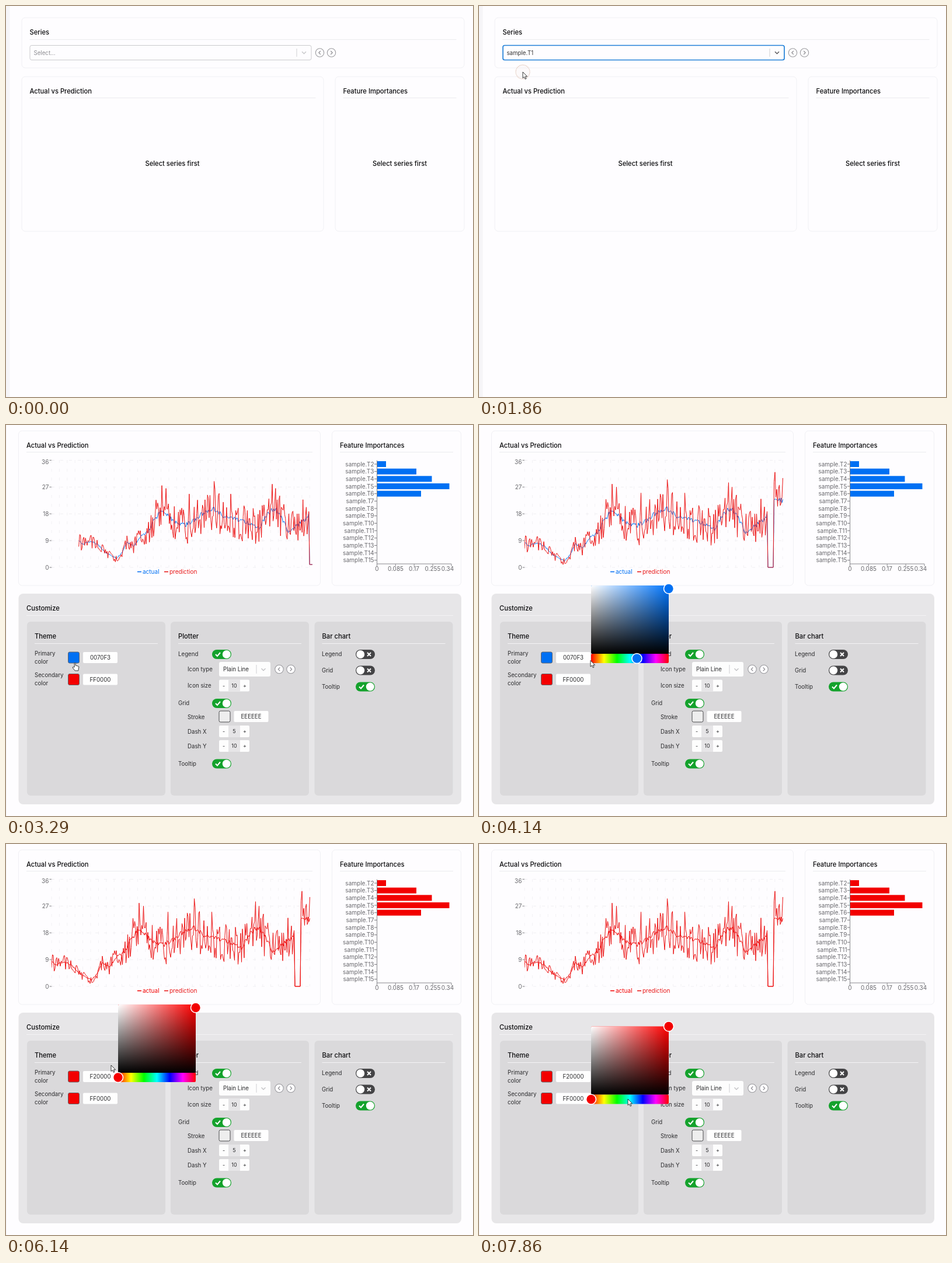
An HTML page for the animation above (8000 ms loop, 800x670 px).

```html
<!DOCTYPE html>
<html lang="en">
<head>
<meta charset="utf-8">
<title>Forecast dashboard</title>
<style>
  html, body { margin: 0; width: 100%; height: 100%; overflow: hidden; background: #fefdff; }
  svg { display: block; width: 800px; height: 670px; font: 9.7px Inter, "Open Sans", sans-serif; }
</style>
</head>
<body>
<svg id="stage" viewBox="0 0 800 670"></svg>
<script>
const LOOP = 8000, FPS = 7, PAGE_SCROLL = 111;
const stage = document.getElementById('stage');

// ---------- drawing helpers ----------
function set(node, attrs) {
  for (const k in attrs) node.setAttribute(k, attrs[k]);
  return node;
}
function el(parent, tag, attrs) {
  return parent.appendChild(set(document.createElementNS('http://www.w3.org/2000/svg', tag), attrs));
}
const group = (parent, attrs) => el(parent, 'g', attrs);
const rect = (p, x, y, width, height, fill, more) => el(p, 'rect', { x, y, width, height, fill, ...more });
const path = (p, d, stroke, more) => el(p, 'path', { d, stroke, fill: 'none', ...more });
function text(p, x, y, str, more) {
  const node = el(p, 'text', { x, y, fill: '#2b2b2d', ...more });
  node.textContent = str;
  return node;
}
const title = (p, x, y, str, more) => text(p, x, y, str, { 'font-size': 11.2, 'font-weight': 500, fill: '#0c0c0e', ...more });
const show = (node, on) => node.setAttribute('display', on ? 'inline' : 'none');
const rule = (p, x1, x2, y, color = '#ebebee') => path(p, `M${x1} ${y}H${x2}`, color);
const card = (p, x, y, w, h) => rect(p, x, y, w, h, '#fefdff', { rx: 6, stroke: '#f0f0f4' });
const chevron = (p, x, y, color) => path(p, `M${x - 3.5} ${y - 1.8}l3.5 3.5l3.5 -3.5`, color, { 'stroke-width': 1.5 });

function arrows(p, x, y) {
  for (const [cx, dir] of [[x, -1], [x + 20, 1]]) {
    el(p, 'circle', { cx, cy: y, r: 7.2, fill: '#fefdff', stroke: '#9b9b9f', 'stroke-width': 1.1 });
    path(p, `M${cx - dir * 1.3} ${y - 3}l${dir * 3} 3l${-dir * 3} 3`, '#8a8a8e', { 'stroke-width': 1.1 });
  }
}
function toggle(p, x, y, on) {
  rect(p, x, y - 8, 33, 16, on ? '#14a22c' : '#444446', { rx: 8 });
  el(p, 'circle', { cx: x + (on ? 24.8 : 8.2), cy: y, r: 7, fill: '#fff' });
  const mark = on ? `M${x + 6} ${y}l3 3l5 -6` : `M${x + 20} ${y - 3}l6 6m0 -6l-6 6`;
  path(p, mark, '#fff', { 'stroke-width': 2 });
}
function stepper(p, y, value) {
  rect(p, 365, y - 10, 52, 20, '#fdfdfd', { rx: 2 });
  rect(p, 381, y - 10, 20, 20, '#e6e5e7');
  [['-', 373], [value, 391], ['+', 409]].forEach(([s, x]) =>
    text(p, x, y + 3.2, s, { 'text-anchor': 'middle', 'font-size': 9 }));
}
function colorField(p, x, y, fill, code, stroke = '#66666a') {
  const box = rect(p, x + .5, y - 9.5, 19, 19, fill, { rx: 2.5, stroke });
  rect(p, x + 26, y - 9.5, 59, 19, '#fefefe', { rx: 2 });
  return { box, label: text(p, x + 55.5, y + 3.5, code, { 'text-anchor': 'middle' }) };
}

// ---------- time helpers ----------
function track(table, at) {
  if (at <= table[0][0]) return table[0].slice(1);
  for (let i = 1; i < table.length; i++) {
    const [a, b] = [table[i - 1], table[i]];
    if (at <= b[0]) {
      const k = (at - a[0]) / (b[0] - a[0]);
      return b.slice(1).map((v, j) => a[j + 1] + (v - a[j + 1]) * k);
    }
  }
  return table.at(-1).slice(1);
}
const clamp = v => Math.max(0, Math.min(1, v));
const bezier = (a, b, s) => 3 * a * s * (1 - s) ** 2 + 3 * b * s * s * (1 - s) + s ** 3;
function ease(x) {
  x = clamp(x);
  let lo = 0, hi = 1;
  for (let i = 0; i < 20; i++) {
    const mid = (lo + hi) / 2;
    if (bezier(.25, .25, mid) < x) lo = mid; else hi = mid;
  }
  return x === 1 ? 1 : bezier(.1, 1, lo);
}
function hsvHex(h, v) {
  const channel = n => {
    const k = (n + h / 60) % 6;
    return Math.round(v * (1 - clamp(Math.min(k, 4 - k)))).toString(16).padStart(2, '0');
  };
  return (channel(5) + channel(3) + channel(1)).toUpperCase();
}

// ---------- gradients and clip ----------
const defs = el(stage, 'defs', {});
function gradient(id, stops, vertical) {
  const g = el(defs, 'linearGradient', { id, x2: vertical ? 0 : 1, y2: vertical ? 1 : 0 });
  stops.forEach(([color, opacity = 1], i) =>
    el(g, 'stop', { offset: i / (stops.length - 1), 'stop-color': color, 'stop-opacity': opacity }));
}
gradient('whiten', [['#fff'], ['#fff', 0]]);
gradient('darken', [['#000', 0], ['#000']], true);
gradient('hues', [0, 60, 120, 180, 240, 300, 360].map(h => [`hsl(${h} 100% 50%)`]));
rect(el(defs, 'clipPath', { id: 'plotArea' }), 78, 160, 447, 200, '#000');

// ---------- page ----------
const strip = rect(stage, 0, 0, 6, 670, '#f6f5f8');
const page = group(stage, {});

card(page, 21.5, 20, 758, 86);
title(page, 35, 48.5, 'Series');
rule(page, 35, 766, 57.5);
const selectBox = rect(page, 35.5, 67.5, 482, 25, '#fefdff', { rx: 3 });
const selectText = text(page, 42, 83.5, '');
const caret = path(page, 'M43 73.5V87', '#333');
path(page, 'M492.5 73V87', '#cfcfd2');
const selectChevron = chevron(page, 505, 80, '#ccc');
arrows(page, 532, 80);

card(page, 21.5, 121, 517, 265);
title(page, 35, 149.5, 'Actual vs Prediction');
rule(page, 35, 525, 157.5);
card(page, 558.5, 121, 221, 265);
title(page, 572, 149.5, 'Feature Importances');
rule(page, 572, 766, 157.5);

const empty = group(page, { 'text-anchor': 'middle' });
for (const x of [279.5, 669]) title(empty, x, 274, 'Select series first');

const results = group(page, {});

// ---------- line chart ----------
const axisText = { fill: '#68686c', 'text-anchor': 'end', 'font-size': 10 };
const yOf = v => 355 - v * 5.1;
const dash = { 'stroke-dasharray': '5 10' };
for (let v = 0; v <= 36; v += 9) {
  path(results, `M78 ${yOf(v)}H525`, '#f0eff2', dash);
  path(results, `M74.5 ${yOf(v)}H78.5`, '#77777b');
  text(results, 73.5, yOf(v) + (v === 36 ? 6.5 : 3.7), v, axisText);
}
for (let x = 78; x < 525; x += 13.4) path(results, `M${x} 171V355`, '#f2f1f4', dash);

const TREND = [[78, 8], [86, 7.4], [101, 8.2], [113, 7], [125, 4.5], [146, 2.2], [156, 4.2], [165, 8], [176, 6.4],
  [190, 10], [205, 12], [216, 16.5], [228, 19], [240, 17], [252, 15], [270, 14], [285, 15.5], [302, 18], [322, 20],
  [340, 17], [372, 15.5], [404, 13], [418, 18], [434, 20], [446, 16], [456, 12], [470, 13.5], [490, 16.5], [505, 23], [522, 22.5]];
const SPREAD = [[78, 3.8], [113, 2.2], [146, 1.6], [180, 3.4], [205, 4.5], [222, 8.5], [250, 7], [322, 8.5], [400, 7], [430, 8.5], [490, 6.5], [522, 8]];
const PEAKS = [[228, 28], [235, 27], [278, 25], [322, 29.5], [352, 25], [428, 28.5], [434, 27], [483, 23], [507, 32], [521, 30]];

let seed = 41;
const random = () => (seed = (seed * 16807) % 2147483647) / 2147483647;
const smooth = [], noisy = [];
for (let x = 78; x <= 521; x += 1.5) {
  const outage = x > 494.5 && x < 504.5;
  const mid = track(TREND, x)[0], swing = track(SPREAD, x)[0];
  const peak = PEAKS.find(p => Math.abs(p[0] - x) <= .75);
  const side = random() < .5 ? -1 : 1;
  const jitter = side * (.1 + .9 * random()) * swing * (side < 0 ? .95 : .85);
  smooth.push([x, outage ? 0 : mid + (random() - .5) * swing * .22]);
  noisy.push([x, outage ? 0 : peak ? peak[1] : Math.max(.5, mid + jitter)]);
}
const lines = group(results, { 'clip-path': 'url(#plotArea)', 'stroke-linejoin': 'round' });
const actual = path(lines, '', '');
const prediction = path(lines, '', '#ec1212');
// Points fly in from the far right at mid height.
const plot = (points, p) => 'M' + points.map(([x, v]) =>
  `${(978 + (x - 978) * p).toFixed(1)} ${(261 + (yOf(v) - 261) * p).toFixed(1)}`).join('L');

const legend = { 'font-size': 10 };
const actualMark = path(results, 'M225 362.5H232', '', { 'stroke-width': 1.6 });
const actualName = text(results, 234, 365.5, 'actual', legend);
path(results, 'M271 362.5H278', '#e81818', { 'stroke-width': 1.6 });
text(results, 280, 365.5, 'prediction', { ...legend, fill: '#e81818' });

// ---------- bar chart ----------
const BARS = [15, 67, 93.5, 123.5, 75];
const bars = [];
for (let i = 0; i < 14; i++) {
  const y = 178 + i * 12.67;
  text(results, 630.5, y + 3.5, 'sample.T' + (i + 2), axisText);
  path(results, `M631 ${y}H635`, '#77777b');
  if (i < BARS.length) bars.push(rect(results, 636, y - 5, 0, 10, ''));
}
path(results, 'M635.5 171.5V349H763v4m-31.9 -4v4m-31.9 -4v4m-31.9 -4v4m-31.8 -4v4', '#88888c');
[[635.5, 0], [667.5, .085], [699, .17], [731, .255], [756.5, .34]].forEach(([x, v]) =>
  text(results, x, 361, v, { ...axisText, 'text-anchor': 'middle' }));

// ---------- customize ----------
rect(results, 21.5, 400, 758.5, 361, '#e7e6e8', { rx: 8 });
title(results, 35, 429, 'Customize');
rule(results, 35, 766, 437.5, '#f3f2f4');
[['Theme', 36], ['Plotter', 282], ['Bar chart', 528.5]].forEach(([name, x]) => {
  rect(results, x, 448, 237, 298, '#dad9db', { rx: 6 });
  title(results, x + 13, 477, name);
  rule(results, x + 13, x + 224, 485.5, '#f3f2f4');
});
[['Primary', 506], ['color', 520], ['Secondary', 543], ['color', 557]].forEach(([s, y]) => text(results, 49, y, s));
const primary = colorField(results, 106, 509.5, '#0070f3', '0070F3');
colorField(results, 106, 547, '#f40000', 'FF0000');

[['Legend', 504, 1], ['Grid', 588, 1], ['Tooltip', 691.5, 1]].forEach(([s, y]) => {
  text(results, 295, y + 3.3, s);
  toggle(results, 353, y, true);
});
[['Icon type', 533], ['Icon size', 561], ['Stroke', 614.5], ['Dash X', 639.5], ['Dash Y', 665]].forEach(([s, y]) => text(results, 311, y, s));
rect(results, 365, 517, 88, 25, '#fdfdfd', { rx: 3 });
text(results, 372, 533.3, 'Plain Line');
path(results, 'M429 522V537', '#cfcfd2');
chevron(results, 441, 530, '#c4c4c7');
arrows(results, 468, 529.5);
[[557.5, 10], [636, 5], [661, 10]].forEach(([y, v]) => stepper(results, y, v));
colorField(results, 364.5, 610.5, '#eeeeee', 'EEEEEE', '#4a4a4d');

[['Legend', 504, false], ['Grid', 531.5, false], ['Tooltip', 559.5, true]].forEach(([s, y, on]) => {
  text(results, 541, y + 3.3, s);
  toggle(results, 599, y, on);
});

// ---------- color picker ----------
const picker = group(page, {});
const pickerBase = rect(picker, 192, 386, 133, 117, '#f00', { rx: 2 });
rect(picker, 192, 386, 133, 117, 'url(#whiten)', { rx: 2 });
rect(picker, 192, 386, 133, 117, 'url(#darken)', { rx: 2 });
rect(picker, 192, 503, 133, 16, 'url(#hues)', { rx: 2 });
const knob = { r: 8.5, stroke: '#fff', 'stroke-width': 1.6 };
const toneKnob = el(picker, 'circle', { cx: 325, ...knob });
const hueKnob = el(picker, 'circle', { cy: 511, ...knob });

// ---------- dropdown ----------
const menu = group(page, {});
rect(menu, 34.5, 98, 484, 201.5, '#000', { rx: 4, opacity: .07 });
rect(menu, 35.5, 98, 482.5, 200, '#fefdff', { rx: 3, stroke: '#dededf', 'stroke-width': .8 });
const hover = rect(menu, 35.5, 0, 471, 24.6, '#dce8ee');
for (let i = 0; i < 8; i++) text(menu, 43, 116 + i * 24.65, 'sample.T' + (i + 1));
rect(menu, 506.5, 98.5, 11, 199, '#f1f1f2');
rect(menu, 507.5, 109, 9, 95, '#c0c0c2');
el(menu, 'path', { d: 'M509.5 105.5l2.5 -3l2.5 3z', fill: '#a2a2a4' });
el(menu, 'path', { d: 'M509.5 290.5l2.5 3l2.5 -3z', fill: '#505052' });

// ---------- pointer ----------
const ring = el(stage, 'circle', { fill: '#f6ece6', 'fill-opacity': .25, stroke: '#d9b8a6', 'stroke-width': 1.3, 'stroke-dasharray': '1.5 1' });
const pointer = group(stage, { 'stroke-linejoin': 'round' });
const shape = { fill: '#fff', stroke: '#222', 'stroke-width': .9 };
const arrow = el(pointer, 'path', { d: 'M0 0V10.6L2.5 8.4L4.2 12.3L6 11.5L4.3 7.8H7.6Z', ...shape });
const hand = el(pointer, 'path', { d: 'M3.2 8V1Q4.2 -.6 5.2 1V5L10 6.3Q11 6.6 10.8 8L9.8 14H4.2L.3 9.2Q-.2 7.3 1.6 7.7Z', ...shape });

// Tables below are in animation steps.
const POINTER = [[1, 708, 272], [3, 540, 205], [5, 330, 112], [6, 262, 86], [7, 262, 86], [9, 201, 153], [11, 95, 118], [12, 75, 113],
  [13, 75, 113], [16, 245, 158], [17, 262, 162], [19, 250, 190], [23, 114, 407], [27, 114, 407], [31, 268, 400], [33, 268, 400],
  [35, 190, 400], [36, 209, 387], [39, 209, 387], [43, 180, 379], [45, 150, 372], [48, 115, 436], [51, 115, 436], [55, 255, 437]];
const SCROLL = [[18, 0], [22, PAGE_SCROLL]];
const HUE = [[33, 212.35], [35, 0]];
const CLICKS = [[7, 262, 86], [12, 75, 113], [26, 116, 408], [45, 150, 372], [49, 116, 437]];

function draw(time) {
  const step = Math.floor((time + 5) * FPS / 1000);
  const now = step * 1000 / FPS;
  const loaded = step >= 16, picked = step >= 13, opened = step >= 7 && !picked;
  const dx = loaded ? 0 : 5.5;
  const [scroll] = track(SCROLL, step);
  const [x, y] = track(POINTER, step);

  set(strip, { width: dx + 1 });
  set(page, { transform: `translate(${dx} ${-scroll})` });
  show(empty, !loaded);
  show(results, loaded);

  const focused = opened || picked;
  set(selectBox, { stroke: focused ? '#2180d8' : '#cacacd', 'stroke-width': focused ? 1.7 : 1 });
  set(selectChevron, { stroke: focused ? '#58585c' : '#c8c8cb' });
  selectText.textContent = picked ? 'sample.T1' : 'Select...';
  set(selectText, { fill: picked ? '#333' : '#8c8c90' });
  show(caret, opened);
  show(menu, opened);
  set(hover, { y: 100.5 + 24.65 * Math.max(0, Math.floor((y - 100.5) / 24.65)) });

  const [hue] = track(HUE, step);
  const code = hsvHex(hue, step > 33 ? 242 : 243), color = '#' + code;
  set(primary.box, { fill: color });
  primary.label.textContent = code;
  set(actualMark, { stroke: color });
  set(actualName, { fill: color });
  const grow = ease((now - 2297) / 400);
  bars.forEach((bar, i) => set(bar, { fill: color, width: BARS[i] * grow }));
  const fly = ease((now - 2210) / 1500);
  set(actual, { d: plot(smooth, fly), stroke: color });
  set(prediction, { d: plot(noisy, fly) });

  const second = step >= 50;
  show(picker, second || (step >= 27 && step < 46));
  set(picker, { transform: `translate(0 ${second ? 37.5 : 0})` });
  set(pickerBase, { fill: `hsl(${hue} 100% 50%)` });
  set(toneKnob, { cy: second ? 386 : 391.5, fill: color });
  set(hueKnob, { cx: 192 + hue / 360 * 133, fill: `hsl(${hue} 100% 48%)` });

  const click = CLICKS.find(c => step >= c[0] && step < c[0] + 3);
  show(ring, click);
  if (click) {
    const age = step - click[0];
    set(ring, { cx: click[1], cy: click[2], r: 8 + 4 * age, opacity: .9 - .15 * age });
  }
  const pressing = (step >= 23 && step < 28) || (step >= 48 && step < 52);
  show(pointer, step > 0);
  set(pointer, { transform: `translate(${x} ${y})` });
  show(hand, pressing);
  show(arrow, !pressing);
}

const start = performance.now();
function tick() {
  draw((performance.now() - start) % LOOP);
  requestAnimationFrame(tick);
}
tick();
</script>
</body>
</html>
```
